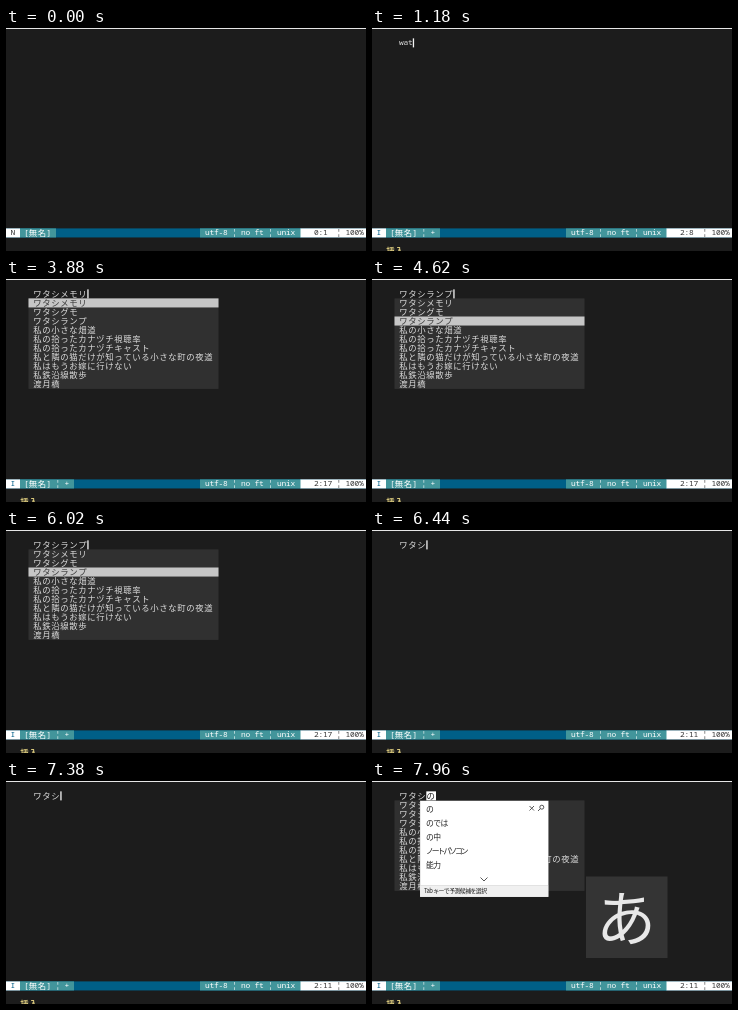
Write an HTML page with a canvas that moves like this. It is 360 by 223 pixels and loops after 8000 ms.

```html
<!DOCTYPE html>
<html lang="ja">
<head>
<meta charset="utf-8">
<style>
html, body { margin: 0; height: 100%; overflow: hidden; background: #1c1c1c; }
canvas { display: block; width: 100vw; height: 100vh; }
</style>
</head>
<body>
<canvas id="stage" width="360" height="223"></canvas>
<script>
const ctx = document.getElementById('stage').getContext('2d');
const LOOP = 8000, CELL = 4.5, ROW = 9.05, TOP = 1.3;
const MONO = '"Noto Sans Mono", "DejaVu Sans Mono", monospace';
const CJK = '"Noto Sans CJK JP", "Noto Sans CJK", sans-serif';
const TEAL = '#42959b', FG = '#dcdcdc', DARK = '#333';

const items = ['ワタシメモリ', 'ワタシグモ', 'ワタシランプ', '私の小さな畑道',
  '私の拾ったカナヅチ視聴率', '私の拾ったカナヅチキャスト',
  '私と隣の猫だけが知っている小さな町の夜道', '私はもうお嫁に行けない',
  '私鉄沿線散歩', '渡月橋'];
const candidates = ['の', 'のでは', 'の中', 'ノートパソコン', '能力'];

const on = { cursor: true }, off = { cursor: false };
const pick = i => ({ text: items[i], selected: i, cursor: true });

// Each step changes part of the editor state at a time in ms.
const steps = [
  [0, { insert: false, changed: false, text: '', pos: '0:1', cursor: false,
        menu: false, selected: -1, compose: '', ime: false }],
  [90, on],
  [390, { insert: true }],
  [460, { changed: true }],
  [540, { pos: '2:5' }],
  [1000, { text: 'w', pos: '2:6' }],
  [1070, { text: 'wa', pos: '2:7' }],
  [1140, { text: 'wat', pos: '2:8' }],
  [1220, { text: 'watas', pos: '2:10' }],
  [1290, { text: 'watasi', pos: '2:11' }],
  [1970, off],
  [2030, { menu: true }],
  [2210, on], [2610, off], [2860, on], [3300, off], [3530, on],
  [3700, pick(0)], [3880, { pos: '2:17' }],
  [4000, pick(1)], [4180, { pos: '2:16' }],
  [4430, pick(2)], [4620, { pos: '2:17' }],
  [5120, off], [5370, on], [5800, off], [6020, on],
  [6070, { text: items[2].slice(0, 5), pos: '2:15', menu: false, selected: -1 }],
  [6250, { text: items[2].slice(0, 4), pos: '2:13' }],
  [6400, { text: 'ワタシ' }],
  [6440, { pos: '2:11' }],
  [6650, { text: 'ワタシn', pos: '2:12' }],
  [6750, { text: 'ワタシno', pos: '2:13' }],
  [7050, { text: 'ワタシn', pos: '2:12' }],
  [7200, { text: 'ワタシ', pos: '2:11' }],
  [7740, { menu: true }],
  [7840, { compose: 'n', cursor: false }],
  [7900, { compose: 'の' }],
  [7950, { ime: true }],
];

const stateAt = t => Object.assign({}, ...steps.filter(s => s[0] <= t).map(s => s[1]));
const isWide = c => c.charCodeAt(0) > 255;
const widthOf = s => [...s].reduce((w, c) => w + (isWide(c) ? 2 : 1) * CELL, 0);

function rect(x, y, w, h, color) {
  ctx.fillStyle = color;
  ctx.fillRect(x, y, w, h);
}

// Terminal text: wide characters take two cells.
function cells(s, x, top, color, weight = 400) {
  ctx.fillStyle = color;
  for (const c of s) {
    const wide = isWide(c);
    ctx.font = `${weight} ${wide ? '8.4px ' + CJK : '7.9px ' + MONO}`;
    ctx.fillText(c, x + (wide ? 0.3 : -0.1), top + (wide ? 7.2 : 7));
    x += widthOf(c);
  }
}

function label(s, x, y, size, color, spacing = 0, weight = 400) {
  ctx.font = `${weight} ${size}px ${CJK}`;
  ctx.letterSpacing = spacing + 'px';
  ctx.fillStyle = color;
  ctx.fillText(s, x, y);
  ctx.letterSpacing = '0px';
}

function line(color, ...points) {
  ctx.strokeStyle = color;
  ctx.lineWidth = 0.9;
  ctx.beginPath();
  points.forEach(([x, y]) => ctx.lineTo(x, y));
  ctx.stroke();
}

function drawStatus(s) {
  const y = TOP + 22 * ROW;
  rect(0, y, 360, ROW, '#005f87');
  rect(0, y, 14, ROW, '#fff');
  rect(14, y, s.changed ? 54 : 36, ROW, TEAL);
  rect(194, y, 101, ROW, TEAL);
  rect(294.5, y, 65.5, ROW, '#fff');
  cells(s.insert ? 'I' : 'N', 4.5, y, s.insert ? '#005f87' : DARK);
  cells('[無名]' + (s.changed ? ' ¦ +' : ''), 18, y, '#fff', 500);
  cells('utf-8 ¦ no ft ¦ unix', 199, y, '#fff', 500);
  cells(s.pos.padEnd(4) + ' ¦ 100%', 308, y, DARK);
  if (s.insert) cells('-- 挿入 --', 0.5, TOP + 24 * ROW, '#d9c87c', 700);
}

function drawMenu(selected) {
  const top = TOP + 2 * ROW;
  rect(22.5, top, 190, ROW * items.length, '#303030');
  items.forEach((item, i) => {
    const y = top + i * ROW, active = i === selected;
    if (active) rect(22.5, y, 190, ROW, '#c6c6c6');
    cells(item, 27, y, active ? '#3a3a3a' : FG);
  });
}

function drawModeBadge(alpha) {
  ctx.globalAlpha = alpha;
  rect(214, 95.5, 81.5, 81.5, '#343434');
  ctx.textAlign = 'center';
  label('あ', 254, 159.5, 60, '#e8e8e8', 0, 300);
  ctx.textAlign = 'left';
  ctx.globalAlpha = 1;
}

function drawCandidates() {
  rect(48, 19.7, 128.5, 96.3, '#c8c8c8');
  rect(48.4, 20, 127.7, 95.5, '#fff');
  rect(48.4, 104.5, 127.7, 11, '#f0f0f0');
  rect(48.4, 104, 127.7, 0.5, '#ccc');
  candidates.forEach((c, i) =>
    label(c, 54, 30.8 + i * 14.1, 7.8, '#222', c.length > 5 ? -2 : -0.6));
  label('Tab キーで予測候補を選択', 52, 112.2, 5.9, '#222', -0.55);
  line('#444', [108.5, 96.5], [112, 100], [115.5, 96.5]);
  line('#444', [157.5, 25], [162, 29.5]);
  line('#444', [162, 25], [157.5, 29.5]);
  line('#444', [166, 30], [168.4, 27.6]);
  ctx.beginPath();
  ctx.arc(169.8, 26.2, 2, 0, 7);
  ctx.stroke();
}

function draw(t) {
  const s = stateAt(t), top = TOP + ROW, end = 27 + widthOf(s.text);
  rect(0, 0, 360, 223, '#1c1c1c');
  rect(0, 0, 360, 1, '#e6e6e6');
  drawStatus(s);
  cells(s.text, 27, top, FG);
  if (s.menu) drawMenu(s.selected);
  if (s.cursor) {
    if (s.insert) rect(end + 0.3, top, 1.3, ROW, '#f4f4f4');
    else rect(9, TOP, CELL, ROW, '#f4f4f4');
  }
  if (s.compose) {
    rect(end + 0.3, top, widthOf(s.compose) + 0.7, ROW, '#fff');
    cells(s.compose, end + 0.3, top, '#1c1c1c');
  }
  if (t > 7570) drawModeBadge(Math.min(1, (t - 7570) / 150));
  if (s.ime) drawCandidates();
}

function tick() {
  draw(performance.now() % LOOP);
  requestAnimationFrame(tick);
}
tick();
</script>
</body>
</html>
```
